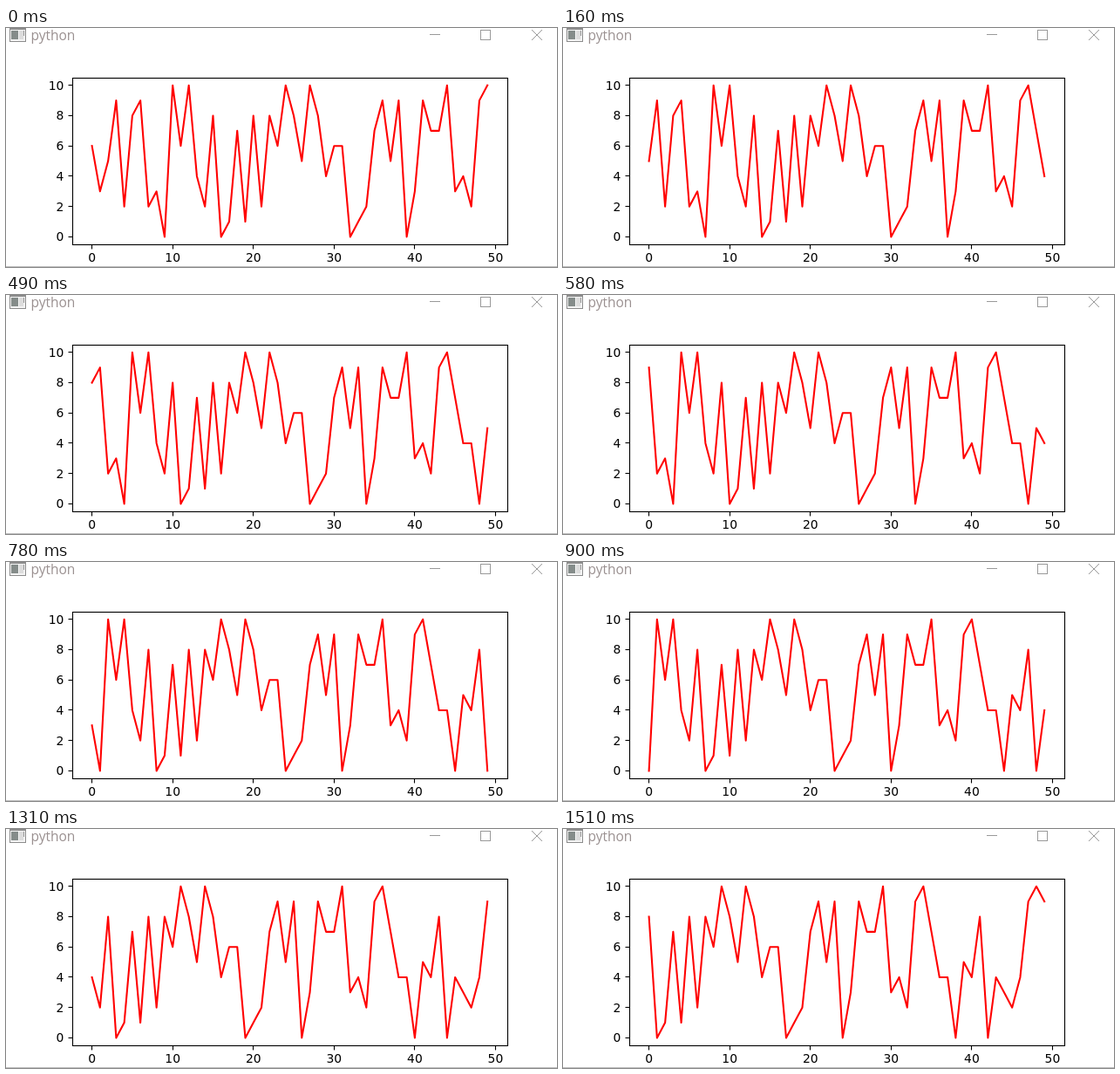
Write an HTML page with a canvas that moves like this. It is 632 px wide and 274 px high and loops after 1560 ms.

```html
<!DOCTYPE html>
<html lang="en">
<head>
<meta charset="utf-8">
<title>python</title>
<style>
  html, body { margin: 0; width: 100%; height: 100%; overflow: hidden; background: #fff; }
  canvas { display: block; }
</style>
</head>
<body>
<canvas id="stage" width="632" height="274"></canvas>
<script>
const ctx = document.getElementById('stage').getContext('2d');

const LOOP = 1560;
const WINDOW = 50;
// Each time the series scrolls one sample to the left.
const STEPS = [40, 160, 250, 370, 490, 580, 700, 780, 900, 990, 1110, 1230, 1310, 1430, 1510];
const SAMPLES = [
  6, 3, 5, 9, 2, 8, 9, 2, 3, 0, 10, 6, 10, 4, 2, 8, 0, 1, 7, 1,
  8, 2, 8, 6, 10, 8, 5, 10, 8, 4, 6, 6, 0, 1, 2, 7, 9, 5, 9, 0,
  3, 9, 7, 7, 10, 3, 4, 2, 9, 10, 7, 4, 4, 0, 5, 4, 8, 0, 4, 3,
  2, 4, 9, 10, 9
];
const AXES = { left: 76.5, top: 57.5, right: 575.5, bottom: 248.5 };

const px = i => 98.6 + i * 9.257;
const py = v => 239.4 - v * 17.364;
const snap = n => Math.floor(n) + 0.5;

function fill(color, x, y, w, h) {
  ctx.fillStyle = color;
  ctx.fillRect(x, y, w, h);
}

function line(x1, y1, x2, y2) {
  ctx.beginPath();
  ctx.moveTo(x1, y1);
  ctx.lineTo(x2, y2);
  ctx.stroke();
}

function drawTitleBar() {
  fill('#8c8c8c', 4, 0, 19, 16);
  fill('#f4f4f4', 5, 2, 17, 13);
  fill('#858c8a', 6, 3, 8, 10);
  fill('#dcdcdc', 15, 3, 5, 10);
  fill('#9a9a9a', 20, 3, 1, 6);

  ctx.font = '15.5px "Open Sans", "Noto Sans", sans-serif';
  ctx.textAlign = 'left';
  ctx.fillStyle = '#9a9090';
  ctx.fillText('python', 28.5, 14);

  ctx.strokeStyle = '#999';
  ctx.lineWidth = 1;
  line(486, 7.5, 498, 7.5);
  ctx.strokeRect(544.5, 2.5, 11, 11);
  line(603, 2, 615, 14);
  line(615, 2, 603, 14);
}

function drawAxes() {
  const { left, top, right, bottom } = AXES;
  ctx.strokeStyle = '#000';
  ctx.fillStyle = '#000';
  ctx.lineWidth = 1.11;
  ctx.strokeRect(left, top, right - left, bottom - top);

  ctx.font = '13.89px "DejaVu Sans", sans-serif';
  ctx.textAlign = 'center';
  for (let i = 0; i <= 50; i += 10) {
    const x = snap(px(i));
    line(x, bottom, x, bottom + 5);
    ctx.fillText(i, px(i), 268);
  }
  ctx.textAlign = 'right';
  for (let v = 0; v <= 10; v += 2) {
    const y = snap(py(v));
    line(left - 5, y, left, y);
    ctx.fillText(v, 66.4, Math.round(py(v) + 5));
  }
}

function drawSeries(shift) {
  ctx.strokeStyle = '#f00';
  ctx.lineWidth = 2.08;
  ctx.lineJoin = 'round';
  ctx.lineCap = 'square';
  ctx.beginPath();
  for (let i = 0; i < WINDOW; i++) ctx.lineTo(px(i), py(SAMPLES[shift + i]));
  ctx.stroke();
  ctx.lineJoin = 'miter';
  ctx.lineCap = 'butt';
}

function draw(time) {
  const t = time % LOOP;
  fill('#fff', 0, 0, 632, 274);
  drawTitleBar();
  drawSeries(STEPS.filter(step => step <= t).length);
  drawAxes();
  fill('#c0c0c0', 0, 273, 632, 1);
}

const start = performance.now();
function tick() {
  draw(performance.now() - start);
  requestAnimationFrame(tick);
}
tick();
</script>
</body>
</html>
```
